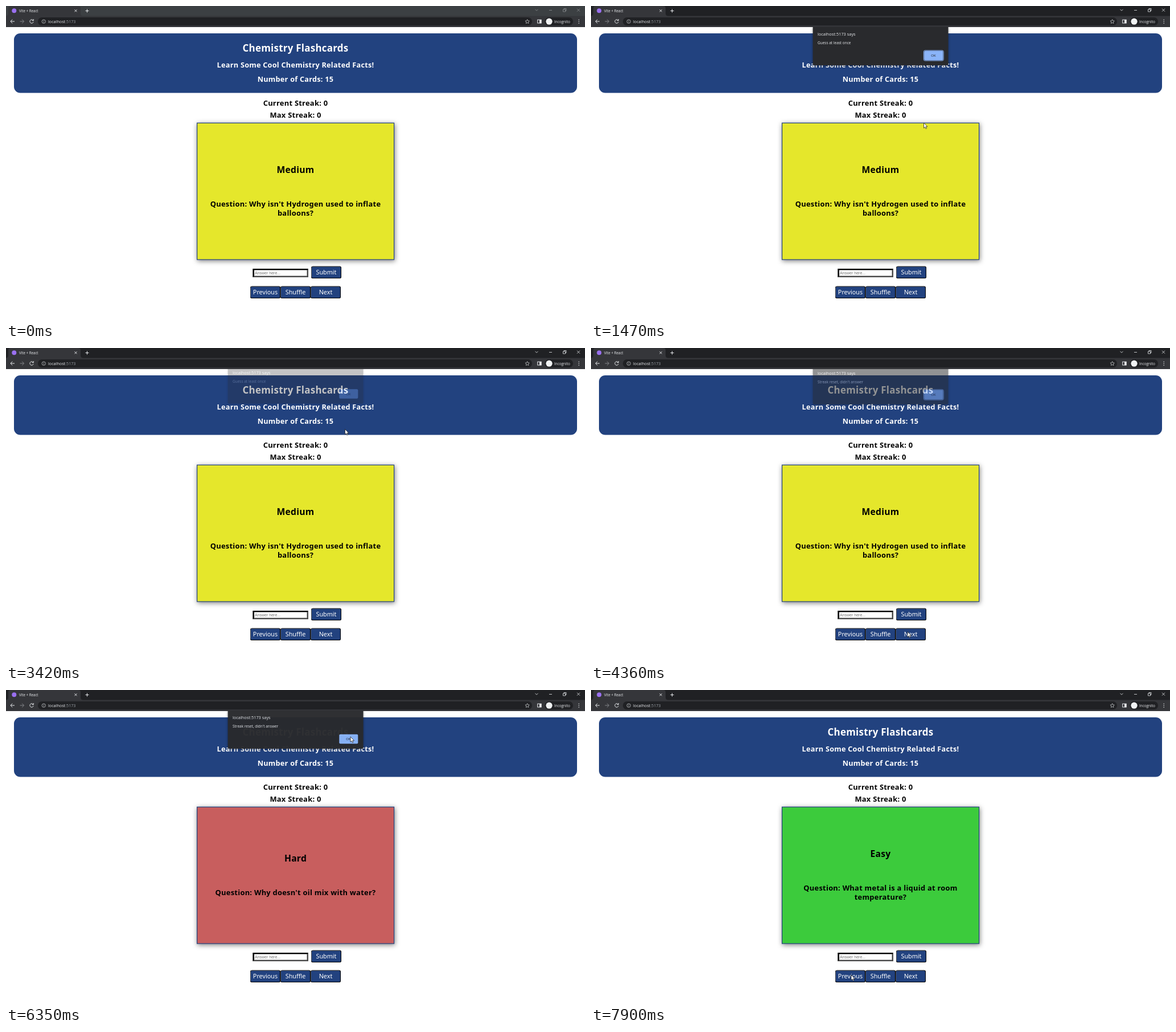
An HTML page for the animation above (8 s loop, 1017 px wide and 551 px high).

```html
<!DOCTYPE html>
<html lang="en">
<head>
<meta charset="utf-8">
<title>Chemistry Flashcards</title>
<style>
  html, body { margin: 0; width: 100%; height: 100%; overflow: hidden; background: #fff; }
  svg { display: block; width: 1017px; height: 551px; }
  text { white-space: pre; }
  .page { font-family: "Noto Sans", "Open Sans", sans-serif; text-anchor: middle; }
  .bold { font-weight: 700; font-size: 12.9px; letter-spacing: .02em; }
  .head { fill: #fff; font-size: 12.7px; }
  .ui { font: 6.4px "Open Sans", "Noto Sans", sans-serif; fill: #e8eaed; }
  .label { font-size: 10.8px; font-weight: 500; fill: #fff; }
  .line { fill: none; stroke: #e8eaed; stroke-width: 1; }
  #card { filter: drop-shadow(1px 2px 4px rgba(0, 0, 0, .5)); }
  #dialog { filter: drop-shadow(0 1px 2px rgba(0, 0, 0, .4)); }
</style>
</head>
<body>
<svg viewBox="0 0 1017 551">
  <defs><clipPath id="below"><rect y="36.5" width="1017" height="515"/></clipPath></defs>

  <g class="page bold">
    <rect x="14" y="48" width="989" height="104.5" rx="11" fill="#22427f"/>
    <g class="head">
      <text x="508.5" y="80" style="font-size:16.95px">Chemistry Flashcards</text>
      <text x="508.5" y="107.5">Learn Some Cool Chemistry Related Facts!</text>
      <text x="508.5" y="133">Number of Cards: 15</text>
    </g>
    <text x="508.5" y="175">Current Streak: 0</text>
    <text x="508.5" y="195.7">Max Streak: 0</text>
    <rect id="card" x="335.6" y="205.3" width="346" height="239.7" stroke="#22427f" stroke-width="1.2"/>
    <text id="level" x="508.5" style="font-size:15.7px"></text>
    <text id="line1" x="508.5"></text>
    <text id="line2" x="508.5" y="367.5"></text>
  </g>

  <rect x="433.5" y="461" width="97.5" height="15" fill="#4c4c4c"/>
  <path d="M433.5 476V461H531L528.5 463.5H436V473.5Z"/>
  <rect x="436" y="463.5" width="92.5" height="10" fill="#fff"/>
  <text x="437" y="471.2" font-size="7" fill="#757575" font-family="Liberation Sans, sans-serif">Answer here...</text>
  <g id="buttons" class="page"></g>

  <!-- browser frame -->
  <rect id="strip" width="1017" height="18"/>
  <path d="M0 17.5Q4 17 4 13V4Q4 0 8 0H127Q131 0 131 4V13Q131 17 135 17.5H1017V37H0Z" fill="#35363a"/>
  <circle cx="14.3" cy="8.3" r="4" fill="#9a70f0"/>
  <text class="ui" x="23" y="10.7" style="font-size:6.2px">Vite + React</text>
  <path class="line" d="M120.5 6.3l4 4m0-4l-4 4M139.5 8.5h6m-3-3v6"/>
  <g id="controls" class="line">
    <path d="M929.5 5.8l2.5 2.5 2.5-2.5" stroke-width=".8"/>
    <path d="M954 7.5h5M978.5 6h4v4h-4zM980 6V4.5h4V8.5h-1.5M1003 4.7l5 5m0-5l-5 5" stroke-width=".8"/>
  </g>
  <path class="line" d="M15 27H8m3.3-3.4L7.9 27l3.4 3.4"/>
  <path class="line" d="M24.5 27h7m-3.3-3.4l3.4 3.4-3.4 3.4" style="stroke:#85878b"/>
  <path class="line" d="M47.6 25a3.2 3.2 0 1 0 .6 2.8M48.3 23v2.6h-2.6"/>
  <rect x="56" y="20" width="868" height="14.3" rx="7.1" fill="#202124"/>
  <g class="line" style="stroke:#c4c7ca;stroke-width:.8">
    <circle cx="66.3" cy="27.2" r="3.2"/>
    <path d="M66.3 26.7v2.2m0-3.8v.8"/>
    <path d="M915.7 23.6l1.1 2.3 2.5.3-1.8 1.8.4 2.5-2.2-1.2-2.2 1.2.4-2.5-1.8-1.8 2.5-.3z"/>
  </g>
  <text class="ui" x="74" y="29.8" style="font-size:7.2px">localhost<tspan fill="#9aa0a6">:5173</tspan></text>
  <rect class="line" x="933.7" y="24.2" width="6.4" height="5.8"/>
  <rect x="937" y="24" width="3.4" height="6.2" fill="#e8eaed"/>
  <rect x="946.5" y="20" width="49.5" height="14.3" rx="7.1" fill="#202124"/>
  <circle cx="954" cy="27.2" r="5.6" fill="#f1f3f4"/>
  <text class="ui" x="963" y="29.5">Incognito</text>
  <path d="M1006.2 24.2v.01m0 2.99v.01m0 2.99v.01" stroke="#e8eaed" stroke-width="1.5" stroke-linecap="round"/>

  <g clip-path="url(#below)">
    <g id="dialog">
      <path d="M389.7 36H627.5V102Q627.5 104 625.5 104H391.7Q389.7 104 389.7 102Z" fill="#292a2d"/>
      <text class="ui" x="398" y="52.3" style="font-size:7.4px">localhost:5173 says</text>
      <text class="ui" id="message" x="398" y="67.3" style="font-size:6.5px"></text>
      <rect id="ring" x="584.4" y="78" width="34.8" height="18" rx="2.2" fill="#292a2d" stroke="#8ab4f8"/>
      <rect x="585.3" y="78.8" width="33" height="16.4" rx="2" fill="#8ab4f8"/>
      <text class="ui" x="601.5" y="89.2" text-anchor="middle" style="font-size:6px;fill:#202124">OK</text>
    </g>
  </g>
  <path id="cursor" d="M0 0V9.2L2.1 7.3 3.5 10.4 5 9.7 3.6 6.7H6.5Z" fill="#fff" stroke="#111" stroke-width=".7"/>
</svg>
<script>
const $ = id => document.getElementById(id);
const LOOP = 8000, FADE = 200;

// pointer tip: time, x, y; equal neighbours are rests
const path = [
  [0, 640, -14], [230, 640, -14], [400, 549, 316], [600, 549, 316],
  [740, 636, 345], [920, 576, 386], [1130, 576, 386], [1470, 584.5, 205.5],
  [1800, 602, 86], [1930, 602, 86], [2340, 581, 422], [2430, 579, 436],
  [2690, 568, 392], [2810, 568, 392], [2980, 573, 320], [3080, 592, 232],
  [3230, 602, 86], [3310, 602, 86], [3420, 595.5, 142], [4150, 556, 498],
  [4370, 556, 498], [4850, 604, 86], [4970, 604, 86], [5150, 583, 217],
  [5600, 556, 498], [5800, 556, 498], [6250, 605, 82], [6370, 605, 82],
  [6800, 457, 500], [6980, 457, 500], [7420, 602, 84], [7530, 602, 84],
  [7640, 569, 252], [7700, 522, 354], [7850, 457, 500], [8000, 457, 500]
];

const guess = "Guess at least once", reset = "Streak reset, didn't answer";
const alerts = [
  [1110, 1890, guess], [2740, 3290, guess],
  [4260, 4955, reset], [5690, 6330, reset], [6880, 7510, reset]
];

const medium = ["#e5e72b", "Medium", "Question: Why isn't Hydrogen used to inflate", "balloons?"];
const easy = ["#3ccb3c", "Easy", "Question: What metal is a liquid at room", "temperature?"];
const hard = ["#c85e5e", "Hard", "Question: Why doesn't oil mix with water?", ""];
const cards = [[0, medium], [4955, easy], [6330, hard], [7510, easy]];

const clamp = v => Math.min(1, Math.max(0, v));
const smooth = v => v * v * (3 - 2 * v);

function slope(i, k) {
  const a = path[i - 1], b = path[i], c = path[i + 1];
  const rests = (p, q) => p[1] === q[1] && p[2] === q[2];
  if (!a || !c || rests(a, b) || rests(b, c)) return 0;
  return (c[k] - a[k]) / (c[0] - a[0]);
}

function pointer(t) {
  const i = path.findLastIndex((p, n) => p[0] <= t && n < path.length - 1);
  const a = path[i], b = path[i + 1], span = b[0] - a[0], u = (t - a[0]) / span;
  return [1, 2].map(k => a[k] + (b[k] - a[k]) * smooth(u)
    + span * u * (1 - u) * ((1 - u) * slope(i, k) - u * slope(i + 1, k)));
}

function button(x, y, label) {
  return `<rect x="${x}" y="${y}" width="53" height="21.3" rx="2.5" fill="#000"/>
    <path d="M${x + .5} ${y + 19}V${y + 3}Q${x + .5} ${y + .5} ${x + 3} ${y + .5}H${x + 51}" fill="none" stroke="#4c4c4c"/>
    <rect x="${x + 1}" y="${y + 1}" width="51" height="19.3" rx="1.7" fill="#22427f"/>
    <text class="label" x="${x + 26.5}" y="${y + 14.2}">${label}</text>`;
}
$("buttons").innerHTML = button(536, 456.7, "Submit") + button(429, 491.7, "Previous")
  + button(482, 491.7, "Shuffle") + button(535, 491.7, "Next");

function draw(t) {
  const focused = t >= 30;
  $("strip").setAttribute("fill", focused ? "#202124" : "#3c4043");
  $("controls").setAttribute("opacity", focused ? 1 : .45);

  const [color, level, line1, line2] = cards.findLast(c => c[0] <= t)[1];
  const drop = line2 ? 0 : 7.7;
  $("card").setAttribute("fill", color);
  $("level").textContent = level;
  $("level").setAttribute("y", 293 + drop);
  $("line1").textContent = line1;
  $("line1").setAttribute("y", 352 + drop);
  $("line2").textContent = line2;

  const [x, y] = pointer(t);
  $("cursor").setAttribute("transform", `translate(${x} ${y})`);

  const alert = alerts.find(a => t >= a[0] && t < a[1] + FADE);
  $("dialog").style.display = alert ? "" : "none";
  if (alert) {
    const [open, close, message] = alert;
    const shown = Math.min(clamp((t - open) / FADE), 1 - clamp((t - close) / FADE));
    $("message").textContent = message;
    $("dialog").setAttribute("opacity", smooth(shown));
    $("dialog").setAttribute("transform", `translate(0 ${10 * (shown - 1)})`);
    const over = x > 584 && x < 620 && y > 77 && y < 97;
    $("ring").style.display = over || t > close ? "none" : "";
  }
}

const start = performance.now();
function tick() {
  draw((performance.now() - start) % LOOP);
  requestAnimationFrame(tick);
}
tick();
</script>
</body>
</html>
```
